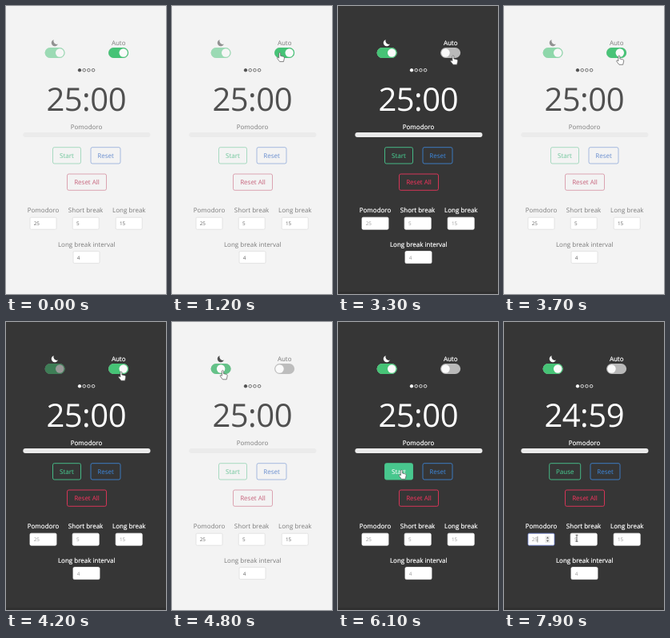
Recreate the animation shown at these times as an HTML page. Size 200 px wide and 360 px high, loop 8000 ms.

```html
<!DOCTYPE html>
<html lang="en">
<head>
<meta charset="utf-8">
<title>Pomodoro timer</title>
<style>
  html, body { margin: 0; height: 100%; overflow: hidden; }
  svg {
    display: block; width: 100vw; height: 100vh;
    --bg: #f3f3f3; --ink: #505050; --label: #7b7b7b; --bar: #ebebeb; --off: #bdbdbd;
    --green: #7ccaa3; --blue: #7798d2; --red: #cc7389; --line: .7; --field: #dedede; --value: #666;
    background: var(--bg);
    font: 8px "Open Sans", "Noto Sans", sans-serif;
    text-rendering: geometricPrecision;
  }
  svg.dark {
    --bg: #363636; --ink: #fff; --label: #fff; --bar: #ebebeb; --off: #b9b9b9;
    --green: #48c78e; --blue: #3e82d0; --red: #e8365c; --line: 1; --field: #fff; --value: #999;
  }
  text { fill: var(--label); text-anchor: middle; }
  .dark text { stroke: var(--label); stroke-width: .2; }
  .dark .plain { stroke: none; }
  #clock { font-size: 40px; letter-spacing: -.5px; fill: var(--ink); }
  #moon { fill: var(--ink); }
  #foot { fill: #303030; visibility: hidden; }
  .dark #foot { visibility: visible; }
  .dot { fill: none; stroke: var(--ink); stroke-width: .8; }
  .dot.on { fill: var(--ink); }
  .btn rect { fill: none; stroke: var(--c); stroke-width: .9; stroke-opacity: var(--line); }
  .btn text, .dark .btn text { fill: var(--c); stroke: var(--c); stroke-width: .08; }
  .btn.full rect { fill: #48c78e; stroke: #48c78e; stroke-opacity: 1; }
  .btn.full text { fill: #fff; stroke: #fff; }
  .field rect { fill: #fff; stroke: var(--field); stroke-width: .8; }
  .field text { font-size: 6.3px; fill: var(--value); text-anchor: start; stroke: none !important; }
  .field.focus rect { stroke: #6d80d0; }
  #cursor path { display: none; fill: #fff; stroke: #555; stroke-width: .7; stroke-linejoin: round; }
  #cursor path.show { display: block; }
  #cursor .beam { fill: none; stroke: #333; }
</style>
</head>
<body>
<svg id="stage" viewBox="0 0 200 360" preserveAspectRatio="none">
  <rect id="foot" y="357" width="200" height="3"/>
  <path id="moon" d="M59.6 41.9A4.3 4.3 0 1 0 65 47.6A4.3 4.3 0 0 1 59.6 41.9z"/>
  <text x="140.7" y="48.8">Auto</text>
  <g id="switches"></g>
  <g id="dots"></g>
  <text id="clock" class="plain" x="100.2" y="131.3">25:00</text>
  <text x="100.5" y="154.3">Pomodoro</text>
  <rect x="21.3" y="158" width="159.2" height="6" rx="3" fill="var(--bar)"/>
  <g id="buttons"></g>
  <g id="fields"></g>
  <g id="edit">
    <path d="M41.9 268v7.5" stroke="#444" stroke-width=".6"/>
    <rect x="51.5" y="267.2" width="6" height="9" fill="#e9e9e9"/>
    <path d="M53 270.6l1.5-2 1.5 2zM53 272.8l1.5 2 1.5-2z" fill="#555"/>
  </g>
  <g id="cursor">
    <path class="arrow" d="M0 0V10L2.4 7.8 4 11.3 5.5 10.6 4 7.2H7z"/>
    <path class="hand" d="M-1.6.6q1-1.4 2 0V4l3.8 1q1.2.4 1 1.8L4.2 11.3H-.6L-3.6 7.4q-.6-1.6.8-1.4L-1.6 6.8z"/>
    <path class="beam" d="M-1.5-4H1.5M0-4V4M-1.5 4H1.5"/>
  </g>
</svg>
<script>
const $ = id => document.getElementById(id);
const stage = $('stage');

function add(parent, tag, attrs = {}, text = '') {
  const el = document.createElementNS('http://www.w3.org/2000/svg', tag);
  for (const key in attrs) el.setAttribute(key, attrs[key]);
  el.textContent = text;
  parent.append(el);
  return el;
}

function makeSwitch(x) {
  const g = add($('switches'), 'g');
  add(g, 'rect', { x, y: 52, width: 25, height: 13, rx: 6.5, fill: 'var(--off)' });
  const on = add(g, 'rect', { x, y: 52, width: 25, height: 13, rx: 6.5, fill: '#46c376' });
  const knob = add(g, 'circle', { cy: 58.5, r: 5.2, fill: '#fafafa' });
  return (k, opacity = 1) => {
    on.setAttribute('opacity', k * (2 - k));
    knob.setAttribute('cx', x + 6.4 + 12.2 * k);
    g.setAttribute('opacity', opacity);
  };
}

function makeButton(x, y, w, label, color) {
  const g = add($('buttons'), 'g', { class: 'btn', style: `--c: var(--${color})` });
  add(g, 'rect', { x, y, width: w, height: 20.3, rx: 2 });
  add(g, 'text', { x: x + w / 2, y: y + 13 }, label);
  return g;
}

function makeField(x, y, value, label, mid) {
  add($('fields'), 'text', { x: mid, y: y - 6 }, label);
  const g = add($('fields'), 'g', { class: 'field' });
  add(g, 'rect', { x, y, width: 33, height: 15, rx: 1.5 });
  add(g, 'text', { x: x + 4.7, y: y + 9.9 }, value);
  return g;
}

const moonSwitch = makeSwitch(48.6);
const autoSwitch = makeSwitch(128.1);
for (let i = 0; i < 4; i++)
  add($('dots'), 'circle', { class: i ? 'dot' : 'dot on', cx: 92 + 5.7 * i, cy: 80.2, r: 1.8 });

const start = makeButton(58.5, 176.7, 35, 'Start', 'green');
const pause = makeButton(56.7, 176.7, 39, 'Pause', 'green');
const reset = makeButton(106, 176.7, 37, 'Reset', 'blue');
makeButton(76.5, 210, 49, 'Reset All', 'red');

const work = makeField(30, 264.2, '25', 'Pomodoro', 46.5);
makeField(83.2, 264.2, '5', 'Short break', 99.6);
makeField(137.2, 264.2, '15', 'Long break', 153.8);
makeField(84, 306.6, '4', 'Long break interval', 100.7);

// time, x, y, shape
const track = [
  [200, 5, 186, 'arrow'], [400, 60, 132, 'arrow'], [600, 128, 66, 'hand'], [700, 142, 57, 'hand'],
  [1100, 142, 57, 'hand'], [1500, 115, 62, 'arrow'], [1700, 125, 67, 'arrow'], [1800, 131, 62, 'hand'],
  [2000, 141, 59, 'hand'], [2300, 144.5, 62, 'hand'], [4300, 144.5, 62, 'hand'],
  [4400, 105, 64, 'arrow'], [4500, 64, 60.5, 'hand'], [5600, 64, 60.5, 'hand'],
  [5700, 65, 72, 'arrow'], [5900, 73, 140, 'arrow'], [6000, 79, 180, 'hand'], [6100, 80, 185, 'hand'],
  [6600, 80, 185, 'hand'], [6800, 72, 205, 'arrow'], [7100, 52, 252, 'arrow'],
  [7200, 48, 264, 'beam'], [7400, 46, 271, 'beam'], [7700, 46, 271, 'beam'],
  [7800, 66, 271, 'arrow'], [7900, 91, 270.3, 'beam']
];

const clamp = v => Math.min(1, Math.max(0, v));
const easeOut = v => 1 - (1 - v) ** 1.7;
const turn = (t, at) => easeOut(clamp((t - at) / 300));

function moveCursor(t) {
  const next = track.findIndex(p => p[0] > t);
  const a = track[next < 0 ? track.length - 1 : Math.max(0, next - 1)];
  const b = next < 0 ? a : track[next];
  const k = a === b ? 0 : clamp((t - a[0]) / (b[0] - a[0]));
  const x = a[1] + (b[1] - a[1]) * k, y = a[2] + (b[2] - a[2]) * k;
  const cursor = $('cursor');
  cursor.setAttribute('visibility', t < 200 ? 'hidden' : 'visible');
  cursor.setAttribute('transform', `translate(${x} ${y})`);
  for (const path of cursor.children) path.classList.toggle('show', path.classList.contains(a[3]));
}

function draw(t) {
  const autoOn = t < 2600 || (t >= 3500 && t < 4200);
  const moonOn = t < 4800 || t >= 5400;
  const running = t >= 6300, editing = t >= 7700;
  const autoK = 1 - turn(t, 2600) + turn(t, 3500) - turn(t, 4200);
  const moonK = 1 - turn(t, 4700) + turn(t, 5300);
  const dark = !autoOn && moonOn;

  stage.classList.toggle('dark', dark);
  $('moon').setAttribute('opacity', autoOn ? .6 : 1);
  autoSwitch(autoK);
  moonSwitch(moonK, 1 - .5 * autoK);
  $('clock').textContent = t < 7200 ? '25:00' : '24:59';

  start.setAttribute('visibility', running ? 'hidden' : 'visible');
  pause.setAttribute('visibility', running ? 'visible' : 'hidden');
  start.classList.toggle('full', t >= 6000);
  pause.classList.toggle('full', !editing);
  reset.setAttribute('transform', `translate(${running ? 2 : 0} 0)`);
  work.classList.toggle('focus', editing);
  $('edit').setAttribute('visibility', editing ? 'visible' : 'hidden');
  moveCursor(t);
}

function tick() {
  draw(Math.floor(performance.now() % 8000 / 100) * 100);
  requestAnimationFrame(tick);
}
tick();
</script>
</body>
</html>
```
